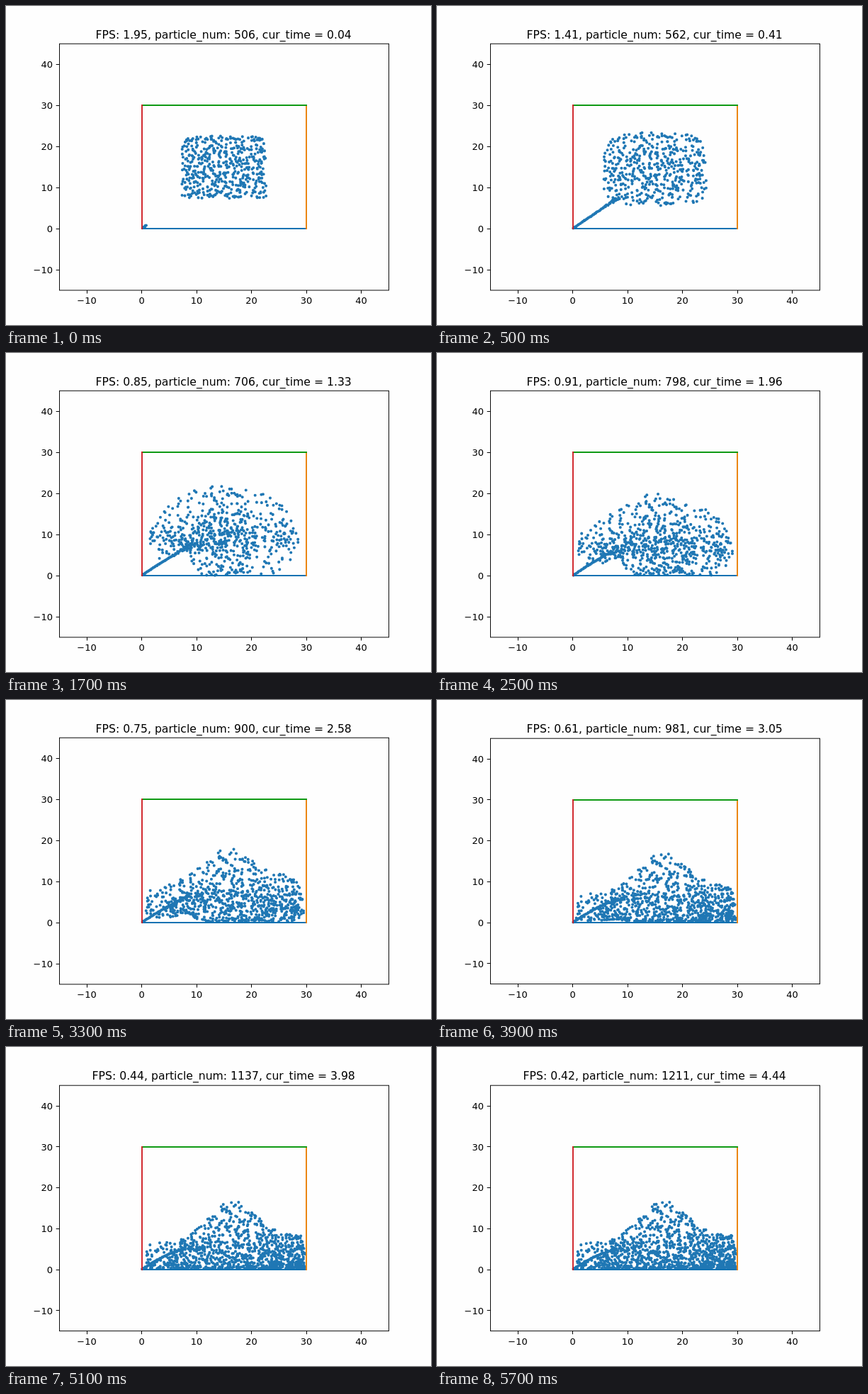
Write an HTML page with a canvas that moves like this. It is 600x450 px and loops after 5800 ms.

```html
<!DOCTYPE html>
<html lang="en">
<head>
<meta charset="utf-8">
<title>Particle simulation</title>
<style>
html, body { margin: 0; width: 100%; height: 100%; overflow: hidden; background: #fefefe; }
canvas { display: block; width: 600px; height: 450px; }
</style>
</head>
<body>
<canvas id="stage" width="600" height="450"></canvas>
<script>
const ctx = document.getElementById('stage').getContext('2d');
const STEP = 100, STEPS = 58, BASE = 500, TOTAL = 1211, SIZE = 30;
const FONT = '"DejaVu Sans", sans-serif';

// Readouts: loop ms, fps, particle count, simulated seconds
const READOUT = [
  [0, 1.95, 506, 0.04], [500, 1.41, 562, 0.41], [1700, 0.85, 706, 1.33],
  [2500, 0.91, 798, 1.96], [3300, 0.75, 900, 2.58], [4600, 0.45, 1075, 3.6],
  [5700, 0.42, TOTAL, 4.44]
];
const MS = 0, RATE = 1, COUNT = 2, SIM = 3;

const mix = (a, b, k) => a + (b - a) * k;

// Linear lookup between two readout columns
function readout(from, to, value) {
  let i = 0;
  while (i < READOUT.length - 2 && value > READOUT[i + 1][from]) i++;
  const a = READOUT[i], b = READOUT[i + 1];
  return mix(a[to], b[to], (value - a[from]) / (b[from] - a[from]));
}

function fold(v) {
  v = Math.abs(v);
  return v > 1 ? 2 - v : v;
}

function smooth(v) {
  v = Math.max(0, Math.min(1, v));
  return v * v * (3 - 2 * v);
}

function seeded(a) {
  return () => {
    a = (a + 0x6d2b79f5) | 0;
    let t = Math.imul(a ^ (a >>> 15), 1 | a);
    t = (t + Math.imul(t ^ (t >>> 7), 61 | t)) ^ t;
    return ((t ^ (t >>> 14)) >>> 0) / 4294967296;
  };
}

const rand = seeded(4127);

// Evenly scattered sites, shaken a little
const particles = Array.from({ length: TOTAL }, (_, i) => {
  const ju = rand() * 2 - 1, jv = rand() * 2 - 1;
  return {
    u: fold((0.5 + i * 0.7548776662) % 1 + ju * 0.06),
    v: fold((0.5 + i * 0.5698402910) % 1 + jv * 0.06),
    ju, jv,
    born: i < BASE ? null : Math.max(0, readout(COUNT, SIM, i))
  };
});

const jetHeight = (x, now) => 0.92 * x - 0.008 * now * x * x;

// Falling block that rounds and spreads
function blob(u, v, now) {
  const a = Math.min(now, 1.4), bell = 0.35 * a;
  const gather = w => mix(w, w ** 3, bell);
  const w = 2 * u - 1, z = 2 * v - 1;
  const round = (1 - w ** 4) ** (0.35 * a);
  const x = 15 + (7.5 + 4.5 * a) * gather(w);
  const y = Math.abs(15 - 2.8 * a * a + (7.5 + 3.6 * a) * round * gather(z));
  // Little falls beneath the jet
  const under = Math.max(0, jetHeight(x, now) - y);
  return [x, y + 2 * under * smooth((10 - x) / 3) * Math.min(1, a)];
}

// Pool on the floor with a hump above the jet's end
function pool(u, v) {
  const x = 0.3 + (SIZE - 0.5) * u ** 0.68;
  const top = 6 + 0.07 * x + 9.5 * Math.exp(-(((x - 16.5) / 6) ** 2));
  return [x, 0.25 + top * v ** 1.75];
}

function place(p, now) {
  const [bx, by] = blob(p.u, p.v, now), [qx, qy] = pool(p.u, p.v);
  const settle = smooth((now - 1) / 2.4);
  const x = mix(bx, qx, settle), y = mix(by, qy, settle);
  if (p.born === null) return [x, y];
  // Jet from the corner, then out into the body
  const age = Math.max(0, now - p.born);
  const spread = 0.06 + 1.8 * Math.max(0, age - 0.24);
  const jx = 13 * Math.tanh(1.7 * age);
  const out = smooth((age - 0.28) / 0.8);
  return [mix(jx + p.ju * spread, x, out), mix(jetHeight(jx, now) + p.jv * spread, y, out)];
}

function line(x1, y1, x2, y2, color, width) {
  ctx.strokeStyle = color;
  ctx.lineWidth = width;
  ctx.beginPath();
  ctx.moveTo(x1, y1);
  ctx.lineTo(x2, y2);
  ctx.stroke();
}

function label(text, x, y, size, align) {
  ctx.font = size + 'px ' + FONT;
  ctx.textAlign = align;
  ctx.fillStyle = '#000';
  ctx.fillText(text, x, y);
}

function draw(step) {
  const ms = step * STEP;
  const now = readout(MS, SIM, ms);
  const count = Math.round(readout(MS, COUNT, ms));
  const late = ms >= 3500;
  const left = 75.3, right = 540.3;
  const top = late ? 54.2 : 53.3, bottom = late ? 400.6 : 401;
  const px = x => left + (x + 15) * (right - left) / 60;
  const py = y => bottom - (y + 15) * (bottom - top) / 60;

  ctx.fillStyle = '#fefefe';
  ctx.fillRect(0, 0, 600, 450);

  ctx.fillStyle = '#1f77b4';
  ctx.beginPath();
  for (const p of particles.slice(0, count)) {
    const [x, y] = place(p, now);
    const cx = px(x), cy = py(y);
    ctx.moveTo(cx + 2.05, cy);
    ctx.arc(cx, cy, 2.05, 0, Math.PI * 2);
  }
  ctx.fill();

  const x0 = Math.round(px(0)), x1 = Math.round(px(SIZE));
  const y0 = Math.round(py(0)), y1 = Math.round(py(SIZE));
  ctx.lineCap = 'square';
  line(x0, y0, x1, y0, '#1272b2', 1.9);
  line(x1, y0, x1, y1, '#ea8008', 1.9);
  line(x1, y1, x0, y1, '#0f9a14', 1.9);
  line(x0, y1, x0, y0, '#cf2026', 1.9);

  ctx.strokeStyle = '#000';
  ctx.lineWidth = 0.95;
  ctx.strokeRect(75.5, top, 465, bottom - top);

  ctx.lineCap = 'butt';
  for (let n = -10; n <= 40; n += 10) {
    const text = String(n).replace('-', '\u2212');
    const x = Math.floor(px(n)) + 0.5, y = Math.floor(py(n)) + 0.5;
    line(x, bottom, x, bottom + 4.6, '#000', 1);
    line(left - 4.6, y, left, y, '#000', 1);
    label(text, px(n), 419.7, 13, 'center');
    label(text, 66, py(n) + 4.9, 13, 'right');
  }

  const fps = readout(MS, RATE, ms).toFixed(2);
  label(`FPS: ${fps}, particle_num: ${count}, cur_time = ${now.toFixed(2)}`, 307.2, 46.2, 15.65, 'center');
}

let shown = -1;
function tick() {
  const step = Math.floor(performance.now() / STEP) % STEPS;
  if (step !== shown) draw(shown = step);
  requestAnimationFrame(tick);
}
tick();
</script>
</body>
</html>
```
